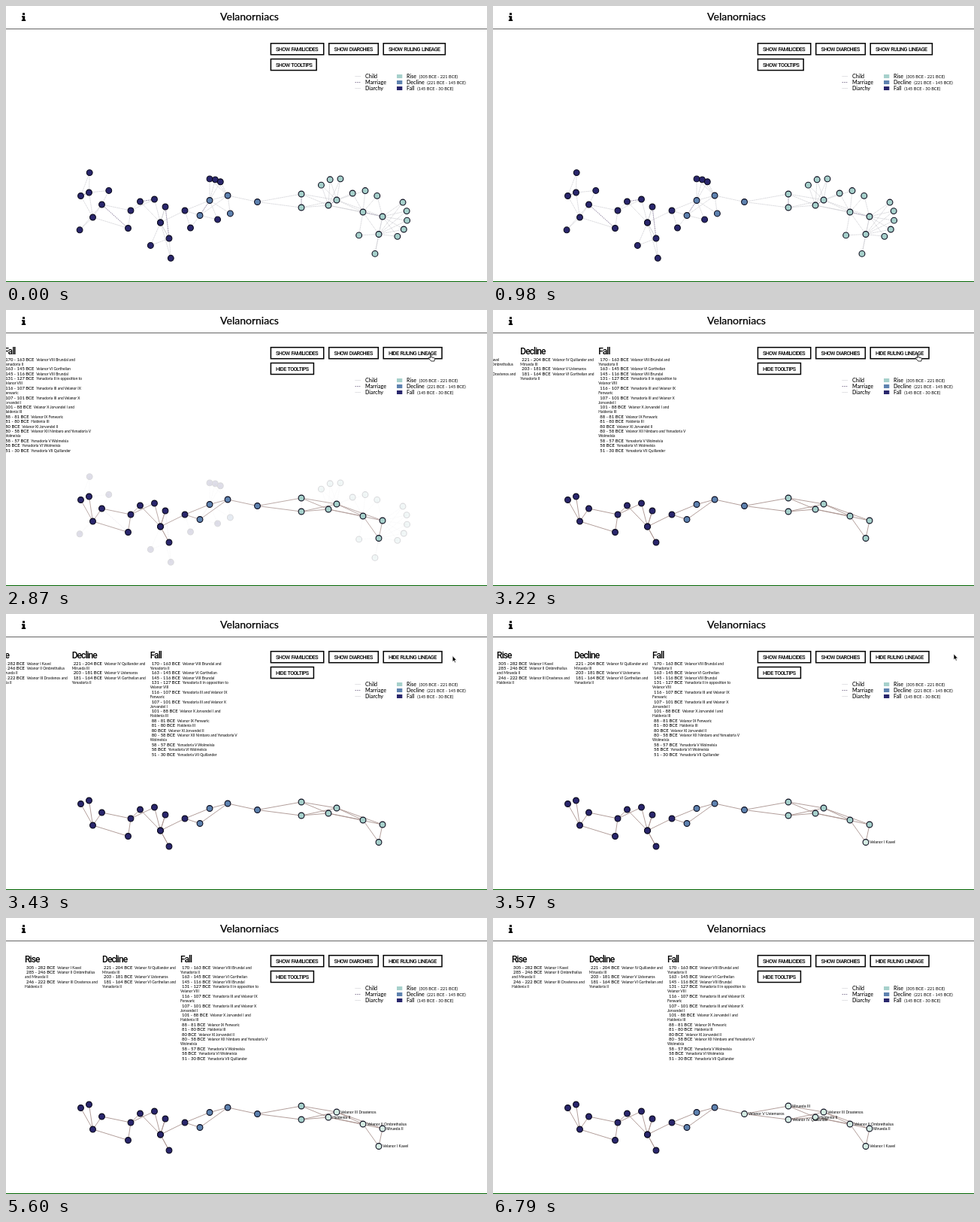
These frames come from a looping animation (640x367 px, 7 s). An HTML page:

```html
<!DOCTYPE html>
<html lang="en">
<head>
<meta charset="utf-8">
<style>
html, body { margin: 0; width: 100%; height: 100%; overflow: hidden; background: #fff; }
svg { display: block; width: 100%; height: 100%; }
.title { font: 400 14px Lato, cursive; stroke: #000; stroke-width: .25; }
.button { font: 500 7.2px Roboto, sans-serif; letter-spacing: -.6px; word-spacing: .9px; }
.heading { font: 500 12px Roboto, sans-serif; letter-spacing: -.95px; }
.date { font: 500 5.9px Lato, sans-serif; }
.name { font: 400 4.9px Lato, sans-serif; }
.legend { font: 500 7.1px Lato, sans-serif; }
.years { font: 400 5.6px Lato, sans-serif; }
.tip { font: 400 5.07px "Liberation Sans", Arial, sans-serif; }
.box { fill: #fff; stroke: #000; stroke-width: 1.5; }
.child { stroke: #c4c4ca; stroke-width: .7; stroke-dasharray: 1.2 .5; }
.marriage { stroke: #66577c; stroke-width: .75; stroke-dasharray: 1.6 1; }
.reign { stroke: #aa938f; stroke-width: .9; }
.node { stroke: #0b0b1c; stroke-width: 1.1; }
.cursor { stroke: #fff; stroke-width: .7; }
</style>
</head>
<body>
<svg viewBox="0 0 640 367">
  <path d="M22 9.3h3v2.8h-3zM21 13.3h4.2v5h1v1.7h-5.4v-1.7h1.2v-3.3h-1z"/>
  <text class="title" x="324" y="19" text-anchor="middle">Velanorniacs</text>
  <path d="M0 30.5H640" stroke="#666"/>
  <rect y="366" width="640" height="1" fill="#006400"/>
  <g id="list"></g>
  <g id="buttons"></g>
  <g id="legend"></g>
  <g id="family"></g>
  <g id="reigns"></g>
  <g id="nodes"></g>
  <g id="tips"></g>
  <circle id="ring" fill="none" stroke="#333" stroke-width=".9"/>
  <g id="arrow"><path class="cursor" d="M0 0V8L1.8 6.4 3 9.2 4.3 8.6 3.1 5.9H5.5z"/></g>
  <g id="hand"><path d="M-1 0c0-1.2 1.6-1.2 1.6 0V3.500l3.400.6q1.200.3 1 1.700L4.400 8.500H.2L-3 4.900q-.7-1 .3-1.400L-1 4.500z" fill="#fff" stroke="#000" stroke-width=".8"/></g>
</svg>
<script>
const $ = id => document.getElementById(id);
const NS = 'http://www.w3.org/2000/svg';
const LOOP = 7000, TOGGLE = 2310, LEAVE = 3270;
const colors = { rise: [166, 208, 203], decline: [94, 130, 175], fall: [41, 38, 108] };
const LIT = [213, 236, 227];

function add(parent, tag, attrs, text = '') {
  const el = parent.appendChild(document.createElementNS(NS, tag));
  for (const key in attrs) el.setAttribute(key, attrs[key]);
  el.textContent = text;
  return el;
}
const ramp = (t, from, to) => Math.max(0, Math.min(1, (t - from) / (to - from)));
const mix = (a, b, k) => a + (b - a) * k;
const rgb = c => `rgb(${c})`;
const easeInOut = p => p < .5 ? 4 * p ** 3 : 1 - 4 * (1 - p) ** 3;
const show = (el, on) => el.style.display = on ? '' : 'none';

// Buttons
function button(x, y, width, label) {
  const g = add($('buttons'), 'g', {});
  add(g, 'rect', { class: 'box', x, y, width, height: 15 });
  add(g, 'text', { class: 'button', x: x + 6.7, y: y + 10.2 }, label);
  return g;
}
button(352.4, 49.7, 70.3, 'SHOW FAMILICIDES');
button(429.7, 49.7, 65.6, 'SHOW DIARCHIES');
const closed = [
  button(502.2, 49.7, 82.2, 'SHOW RULING LINEAGE'),
  button(352.4, 70.5, 60.7, 'SHOW TOOLTIPS')
];
const opened = [
  button(502.2, 49.7, 77.8, 'HIDE RULING LINEAGE'),
  button(352.4, 70.5, 57, 'HIDE TOOLTIPS')
];

// Legend
[
  ['Child', 'child', 'rise', 'Rise', '(305 BCE - 221 BCE)'],
  ['Marriage', 'marriage', 'decline', 'Decline', '(221 BCE - 145 BCE)'],
  ['Diarchy', 'child', 'fall', 'Fall', '(145 BCE - 30 BCE)']
].forEach(([kind, style, era, label, years], i) => {
  const y = 96 + 8 * i, g = $('legend');
  add(g, 'path', { class: style, d: `M464.5 ${y - 2.5}h7.5` });
  add(g, 'text', { class: 'legend', x: 478, y }, kind);
  add(g, 'rect', { x: 520, y: y - 5, width: 7.3, height: 5, fill: rgb(colors[era]) });
  const text = add(g, 'text', { class: 'legend', x: 533, y }, label);
  add(text, 'tspan', { class: 'years', dx: 3.7 }, years);
});

// Reign list: "dates|name", with wrapped lines after a slash
function column(x, title, rows) {
  add($('list'), 'text', { class: 'heading', x, y: 59 }, title);
  let y = 67.6;
  for (const row of rows) {
    const [dates, names] = row.split('|');
    const [first, second] = names.split('/');
    const line = add($('list'), 'text', { class: 'date', x: x + 2, y }, dates + ' BCE');
    add(line, 'tspan', { class: 'name', dx: 2.7 }, first);
    y += 6.37;
    if (second) {
      add($('list'), 'text', { class: 'name', x, y: y - .4 }, second);
      y += 6.37;
    }
  }
}
column(25, 'Rise', [
  '305 - 282|Velanor I Kavel',
  '285 - 246|Velanor II Ombrethalius/and Mirueda II',
  '246 - 222|Velanor III Drastenos and/Haldenia II'
]);
column(128, 'Decline', [
  '221 - 204|Velanor IV Quillander and/Mirueda III',
  '203 - 181|Velanor V Ustemaros',
  '181 - 164|Velanor VI Gorthelian and/Ysmadoria II'
]);
column(232, 'Fall', [
  '170 - 163|Velanor VIII Brundal and/Ysmadoria II',
  '163 - 145|Velanor VI Gorthelian',
  '145 - 116|Velanor VIII Brundal',
  '131 - 127|Ysmadoria II in opposition to/Velanor VIII',
  '116 - 107|Ysmadoria III and Velanor IX/Fenwaric',
  '107 - 101|Ysmadoria III and Velanor X/Jorvandel I',
  '101 - 88|Velanor X Jorvandel I and/Haldenia III',
  '88 - 81|Velanor IX Fenwaric',
  '81 - 80|Haldenia III',
  '80|Velanor XI Jorvandel II',
  '80 - 58|Velanor XII Nimbaro and Ysmadoria V/Wolmeisia',
  '58 - 57|Ysmadoria V Wolmeisia',
  '58|Ysmadoria VI Wolmeisia',
  '51 - 30|Ysmadoria VII Quillander'
]);

// Rulers by generation; kin = how many relatives fan out, direction and spread in degrees
const ruler = (x, y, kin, name) => ({ x, y, kin, name });
const hub = ruler(205.5, 288);
const generations = [
  [ruler(496, 303.5, [2, 139, 76], 'Velanor I Kavel')],
  [ruler(475, 274, [3, -84, 70], 'Velanor II Ombrethalius'), ruler(501, 280, [5, 9, 88], 'Mirueda II')],
  [ruler(440, 258, [3, -108, 56], 'Velanor III Drastenos'), ruler(429, 265, null, 'Haldenia II')],
  [ruler(393, 268, null, 'Velanor IV Quillander'), ruler(393, 250, null, 'Mirueda III')],
  [ruler(334.5, 260.5, null, 'Velanor V Ustemaros')],
  [ruler(295, 252, [1, 82, 0])],
  [ruler(271, 258.5, [3, -75, 30]), ruler(258, 278.5, [1, 13, 0])],
  [ruler(238, 272, [1, 72, 0])],
  [hub],
  [ruler(212, 267), ruler(217, 309, [2, 122, 74])],
  [hub],
  [ruler(178.5, 260), ruler(197.5, 257)],
  [ruler(166, 272)],
  [ruler(127.5, 264), ruler(162.5, 295.5)],
  [ruler(115.5, 281, [1, 136, 0])],
  [ruler(99.5, 252.5), ruler(110.5, 248, [2, -47, 83])]
];
const rulers = generations.flat();
const eraOf = g => colors[g < 4 ? 'rise' : g < 7 ? 'decline' : 'fall'];
const distance = (a, b) => Math.hypot(a.x - b.x, a.y - b.y);

function link(layer, style, a, b) {
  add($(layer), 'path', { class: style, d: `M${a.x} ${a.y}L${b.x} ${b.y}` });
}
function dot(layer, { x, y }, color) {
  return add(layer, 'circle', { class: 'node', cx: x, cy: y, r: 3.9, fill: rgb(color) });
}

const relatives = add($('nodes'), 'g', {});
const tips = [];

function addKin(parent, g) {
  const [count, direction, spread] = parent.kin;
  const reach = 22 + 2.2 * count;
  for (let i = 0; i < count; i++) {
    const turn = count > 1 ? i / (count - 1) - .5 : 0;
    const angle = (direction + spread * turn) * Math.PI / 180;
    const child = {
      x: parent.x + reach * Math.cos(angle),
      y: parent.y + reach * Math.sin(angle)
    };
    // The second parent is the nearest other ruler
    const other = rulers.filter(r => r !== parent)
      .reduce((a, b) => distance(a, child) <= distance(b, child) ? a : b);
    link('family', 'child', parent, child);
    link('family', 'child', other, child);
    dot(relatives, child, eraOf(g + 1));
  }
}

generations.forEach((members, g) => {
  const heirs = generations[g + 1] || [];
  if (members.length > 1) link('family', 'marriage', ...members);
  for (const person of members) {
    for (const heir of heirs) {
      link('family', 'child', person, heir);
      link('reigns', 'reign', person, heir);
    }
    const node = dot($('nodes'), person, eraOf(g));
    if (person.kin) addKin(person, g);
    if (person.name) {
      const text = add($('tips'), 'text', { class: 'tip', x: person.x + 5.2, y: person.y + 1.8 }, person.name);
      tips.push({ node, text, color: eraOf(g), start: 3440 + 760 * g });
    }
  }
});

// Pointer stops: time, x, y
const stops = [
  [1120, 611, 75], [1680, 565.5, 59.5], [LEAVE, 565.5, 59.5], [3570, 613, 53], [3800, 642, 50]
];
function pointerAt(t) {
  const next = Math.max(1, stops.findIndex(s => s[0] > t));
  const [from, x, y] = stops[next - 1], [to, toX, toY] = stops[next];
  const k = easeInOut(ramp(t, from, to));
  return [mix(x, toX, k), mix(y, toY, k)];
}

function draw(t) {
  const on = t >= TOGGLE;
  closed.forEach(b => show(b, !on));
  opened.forEach(b => show(b, on));

  const slide = 354 * (easeInOut(ramp(t, 1914, 4098)) - 1);
  $('list').setAttribute('transform', `translate(${slide})`);

  const fade = ramp(t, 2240, 2980);
  $('reigns').style.opacity = fade;
  $('family').style.opacity = relatives.style.opacity = 1 - fade;

  for (const { node, text, color, start } of tips) {
    const k = ramp(t, start, start + 120);
    text.style.opacity = k;
    node.style.fill = rgb(color.map((c, i) => mix(c, LIT[i], k)));
  }

  const [x, y] = pointerAt(t), isHand = on && t < LEAVE;
  show($('arrow'), t >= 1120 && t < 3800 && !isHand);
  show($('hand'), isHand);
  for (const id of ['arrow', 'hand']) $(id).setAttribute('transform', `translate(${x} ${y})`);

  const ring = $('ring');
  show(ring, t >= 1890 && t < 2030);
  ring.setAttribute('cx', x);
  ring.setAttribute('cy', y + .7);
  ring.setAttribute('r', t < 1960 ? 11 : 8);
}

const began = performance.now();
function tick() {
  draw((performance.now() - began) % LOOP);
  requestAnimationFrame(tick);
}
tick();
</script>
</body>
</html>
```
